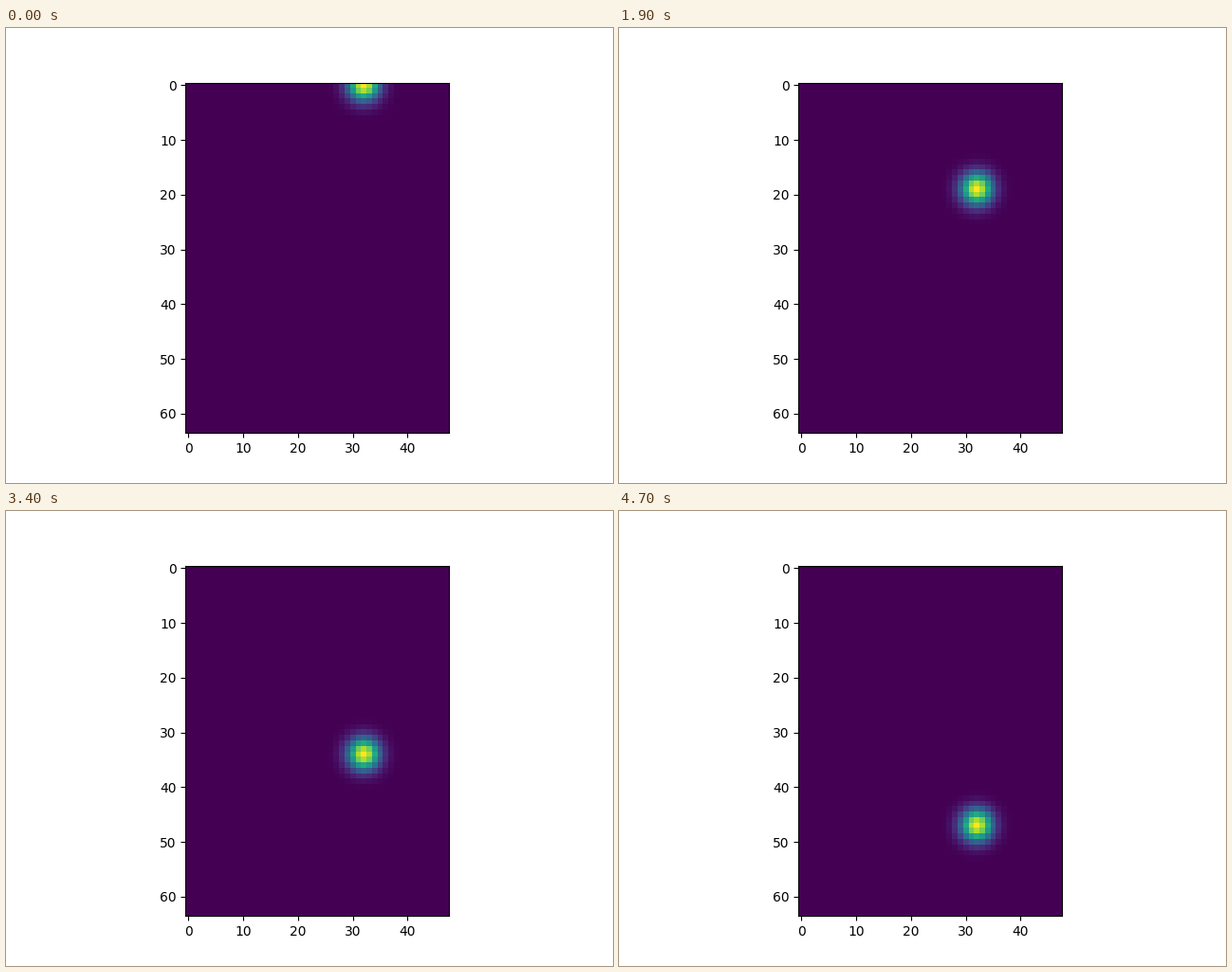
These frames come from a looping animation (640x480 px, 4.8 s). A matplotlib script:

```python
import numpy as np
import matplotlib.pyplot as plt
from matplotlib.animation import FuncAnimation

ROWS, COLS = 64, 48
FRAMES, INTERVAL = 48, 100
CENTER_X, SIGMA = 32, 2.0

y, x = np.mgrid[:ROWS, :COLS]


def blob(row):
    """Gaussian spot centred on the given row."""
    r2 = (x - CENTER_X) ** 2 + (y - row) ** 2
    return np.exp(-r2 / (2 * SIGMA ** 2))


fig, ax = plt.subplots(figsize=(6.4, 4.8), dpi=100)
image = ax.imshow(blob(0), cmap="viridis", vmin=0, vmax=1)


def update(i):
    image.set_data(blob(i))
    return [image]


anim = FuncAnimation(fig, update, frames=FRAMES, interval=INTERVAL,
                     repeat=True, repeat_delay=0)
plt.show()
```
